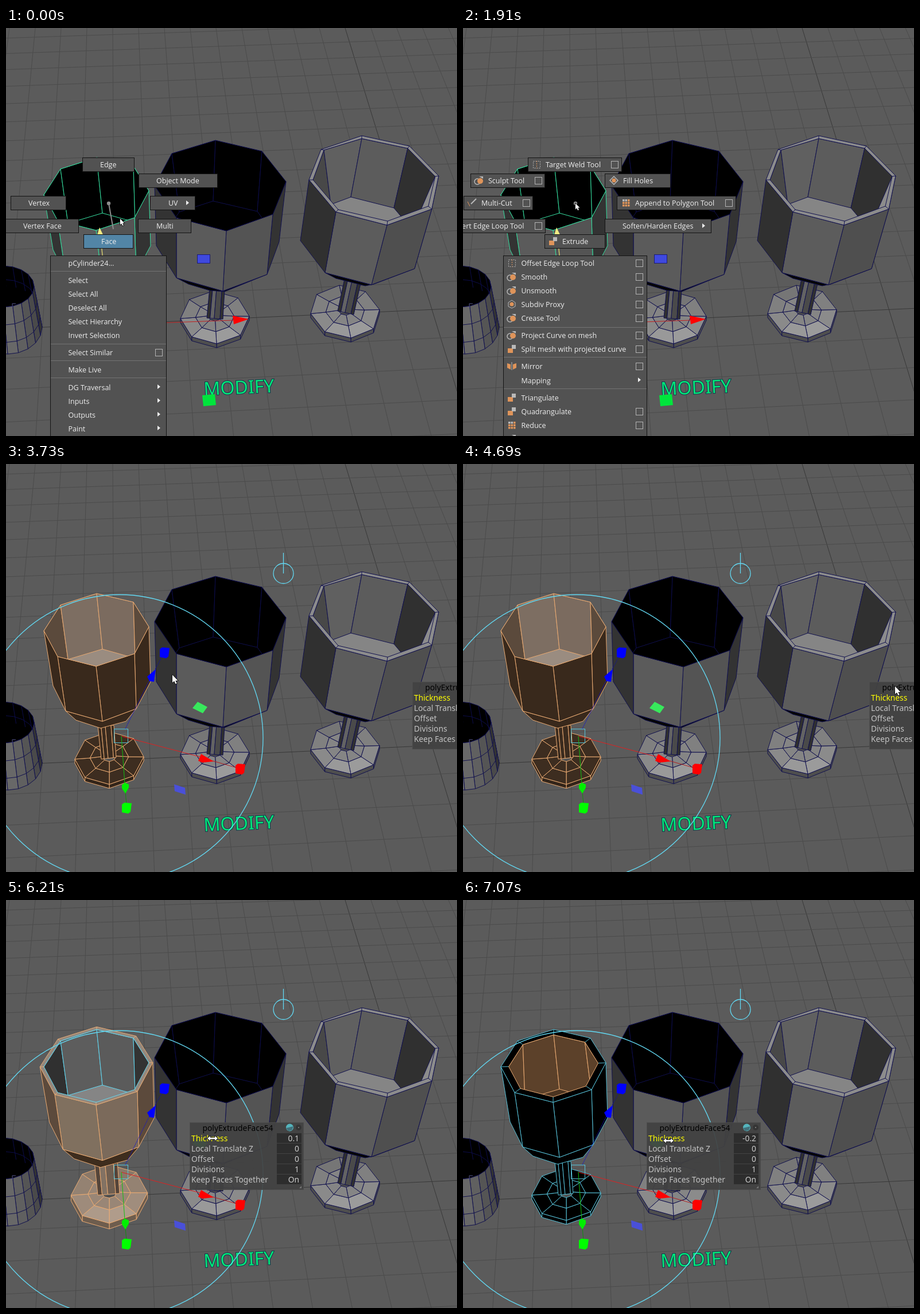
Write an HTML page with a canvas that moves like this. It is 786 px wide and 712 px high and loops after 8 s.

```html
<!DOCTYPE html>
<html lang="en">
<head>
<meta charset="utf-8">
<title>Extruding a goblet</title>
<style>
html, body { margin: 0; width: 100%; height: 100%; overflow: hidden; background: #5b5b5b; }
canvas { display: block; }
</style>
</head>
<body>
<canvas id="stage" width="786" height="712"></canvas>
<script>
const ctx = document.getElementById('stage').getContext('2d');
const LOOP = 8000;
const NAVY = '#11114e', GREEN = '#35dfa0', ORANGE = '#e9aa72', CYAN = '#62d8f2', PEACH = '#df945a';
const MENU_FONT = '12.5px "Open Sans", sans-serif';
const PANEL_FONT = '13.8px "Noto Sans", sans-serif';

// ---------- helpers ----------
const pairs = a => a.reduce((r, n, i) => (i % 2 ? r[r.length - 1].push(n) : r.push([n]), r), []);
const same = (c, n) => Array(n).fill(c);
const mix = (a, b, k) => [a[0] + (b[0] - a[0]) * k, a[1] + (b[1] - a[1]) * k];
const grow = (pts, c, k) => pts.map(p => mix(c, p, k));
const held = (track, t) => track.filter(s => s[0] <= t).pop();

function trace(pts, close) {
  ctx.beginPath();
  pts.forEach(p => ctx.lineTo(p[0], p[1]));
  if (close) ctx.closePath();
}
function poly(pts, fill, wire, width = 1) {
  trace(pts, true);
  if (fill) { ctx.fillStyle = fill; ctx.fill(); }
  if (wire) { ctx.strokeStyle = wire; ctx.lineWidth = width; ctx.stroke(); }
}
function line(color, width, ...xy) {
  trace(pairs(xy));
  ctx.strokeStyle = color;
  ctx.lineWidth = width;
  ctx.stroke();
}
function shape(fill, ...xy) { poly(pairs(xy), fill); }
function rect(x, y, w, h, fill) { ctx.fillStyle = fill; ctx.fillRect(x, y, w, h); }
function frameBox(x, y, w, h, color) {
  ctx.strokeStyle = color;
  ctx.lineWidth = 1;
  ctx.strokeRect(x + .5, y + .5, w - 1, h - 1);
}
function circle(x, y, r, fill, wire, width = 1) {
  ctx.beginPath();
  ctx.arc(x, y, r, 0, 7);
  if (fill) { ctx.fillStyle = fill; ctx.fill(); }
  if (wire) { ctx.strokeStyle = wire; ctx.lineWidth = width; ctx.stroke(); }
}
function label(s, x, y, font, color = '#eeeeee', align = 'left') {
  ctx.font = font;
  ctx.textAlign = align;
  ctx.textBaseline = 'alphabetic';
  ctx.fillStyle = color;
  ctx.fillText(s, x, y + 4.5);
}

// ---------- ground grid ----------
function grid() {
  rect(0, 0, 786, 712, '#5b5b5b');
  const vx = 179, vy = -1338, far = 40860;
  for (let k = -15; k < 6; k++) {
    const x = 591 + 45 * k;
    line(k ? '#4b4b4b' : '#383838', 1, x, 0, vx + (x - vx) * (712 - vy) / -vy, 712);
  }
  for (let k = -5; k < 17; k++) {
    const y = vy + 1855 / (1 + .02674 * k), slope = (vy - y) / (far - vx);
    line(k ? '#4b4b4b' : '#383838', 1, 0, y - vx * slope, 786, y + (786 - vx) * slope);
  }
}

// ---------- goblets: rings run clockwise from the far vertex ----------
const goblet = (rim, low, under, floor, stem, base) => ({
  rim: pairs(rim), low: pairs(low), under: pairs(under),
  floor: pairs(floor), stem: pairs(stem), base: pairs(base)
});
const LEFT = goblet(
  [158, 226, 222, 241, 249, 284, 224, 331, 157, 353, 90, 336, 66, 291, 95, 246],
  [252, 380, 227, 427, 168, 449, 104, 431, 82, 387],
  [122, 447, 165, 461, 209, 449],
  [80, 386, 108, 341, 168, 323, 225, 339, 252, 380],
  [160, 456, 188, 456, 192, 512, 166, 515],
  [180, 513, 60, -2, 0, 46]);
const MIDDLE = goblet(
  [365, 196, 446, 215, 488, 268, 465, 325, 384, 354, 297, 331, 259, 275, 289, 219],
  [476, 373, 455, 430, 378, 459, 297, 436, 262, 380],
  [318, 447, 355, 458, 381, 460],
  [262, 380, 302, 321, 361, 302, 438, 320, 476, 373],
  [355, 454, 381, 456, 378, 508, 350, 506],
  [364, 505, 60, -2, 3, 46]);
const RIGHT = goblet(
  [620, 188, 703, 206, 754, 258, 742, 316, 664, 344, 575, 321, 528, 265, 549, 212],
  [720, 385, 712, 420, 637, 448, 556, 427, 513, 371],
  [575, 437, 626, 450, 641, 447],
  [522, 365, 566, 308, 601, 295, 676, 314, 708, 352],
  [590, 438, 618, 446, 606, 500, 578, 494],
  [591, 495, 60, -3.5, 10, 46]);
RIGHT.lip = pairs([620, 193, 700, 210, 748, 259, 736, 311, 665, 337, 579, 317, 535, 265, 554, 213]);

const STONE = {
  wire: NAVY, out: ['#333333', '#545454', '#5b5b5b', '#333333'], under: '#050505',
  stem: ['#2f2f2f', '#636363', '#4a4a4a', '#303030'],
  base: ['#8b8b8b', '#9b9b9b', '#999999', '#8a8a8a', '#808080', '#767676', '#767676', '#808080'],
  mid: '#858585', skirt: '#4e4e4e', lip: '#8c8c8c',
  inWire: '#0c0c4a', inside: same('#000000', 4), floor: '#000000'
};
const LIT = { inside: ['#484848', '#606060', '#5c5c5c', '#303030'], floor: '#858585' };
const LOOKS = {
  stone: STONE,
  hollow: { ...STONE, ...LIT, inWire: NAVY, out: ['#333333', '#4f4f4f', '#5c5c5c', '#303030'] },
  picked: { ...STONE, wire: GREEN, inWire: GREEN },
  faces: {
    wire: ORANGE, out: same('#39291c', 4), under: '#39291c', stem: same('#3b2b1e', 4),
    base: same('#3d2d20', 8), mid: '#3d2d20', skirt: '#33251a', lip: '#000',
    inWire: ORANGE, inside: ['#5b4a3c', '#7d6e62', '#7b6b5f', '#5b4a3c'], floor: '#9a8c80'
  },
  thick: {
    wire: ORANGE, out: ['#5c4a3c', '#7b6a5b', '#80705f', '#5c4a3c'], under: '#3e2d1e',
    stem: ['#55453a', '#837263', '#705f51', '#54443a'],
    base: ['#a08d7d', '#b09c8b', '#ad9a89', '#9e8b7b', '#948272', '#8a7868', '#8a7868', '#948272'],
    mid: '#998676', skirt: '#6e5d4e', lip: '#94887d', inWire: CYAN,
    inside: ['#303030', '#5d5d5d', '#5b5b5b', '#333333'], floor: '#858585'
  },
  inner: {
    wire: '#55bfd6', out: same('#000000', 4), under: '#000', stem: same('#000000', 4),
    base: same('#000000', 8), mid: '#000', skirt: '#000', lip: '#000',
    inWire: ORANGE, inside: same('#5c412a', 4), floor: '#4b3421'
  }
};

function foot([c, u, v], look, k, drop) {
  const ring = (s, dy) => [...Array(8)].map((_, i) => {
    const a = i * Math.PI / 4, p = Math.cos(a) * s, q = Math.sin(a) * s;
    return [c[0] + u[0] * p + v[0] * q, c[1] + u[1] * p + v[1] * q + dy];
  });
  const edge = ring(k, 0), bottom = ring(k, drop), mid = ring(k * .56, -1), hub = ring(k * .2, -3);
  for (let i = 0; i < 4; i++) {
    poly([edge[i], edge[i + 1], bottom[i + 1], bottom[i]], look.skirt, look.wire);
  }
  for (let i = 0; i < 8; i++) {
    const j = (i + 1) % 8;
    poly([edge[i], edge[j], mid[j], mid[i]], look.base[i], look.wire);
    poly([mid[i], mid[j], hub[j], hub[i]], look.mid, look.wire);
  }
}

function drawGoblet(g, look, thickness = 0) {
  const t = Math.max(thickness, 0), k = 1 + .74 * t;
  const rim = grow(g.rim, [158, 289], k);
  const low = grow(g.low, [167, 375], k);
  const under = grow(g.under, [166, 385], k);
  let lip = g.lip;
  if (thickness > 0) lip = g.rim;
  if (thickness < 0) lip = grow(g.rim, [158, 289], 1 + .74 * thickness);

  foot(g.base, look, 1 + 1.1 * t, 7 + 30 * t);

  const [a, b, c, d] = g.stem.map((p, i) => [p[0] + (i % 3 ? 60 : -60) * t, p[1]]);
  const cuts = [0, .2, .46, .82, 1];
  look.stem.forEach((fill, i) => poly(
    [mix(a, b, cuts[i]), mix(a, b, cuts[i + 1]), mix(d, c, cuts[i + 1]), mix(d, c, cuts[i])], fill, look.wire));

  poly([low[1], low[2], low[3], ...under], look.under, look.wire);
  look.out.forEach((fill, i) => poly([rim[i + 2], rim[i + 3], low[i + 1], low[i]], fill, look.wire));

  if (lip) {
    poly(rim, look.lip, look.wire);
    rim.forEach((p, i) => line(look.wire, 1, ...p, ...lip[i]));
  }
  const mouth = lip || rim, dy = thickness < 0 ? 7 : 0;
  const floor = g.floor.map(p => [p[0], p[1] + dy]);
  ctx.save();
  trace(mouth, true);
  ctx.clip();
  poly([...floor, [floor[4][0], 450], [floor[0][0], 450]], look.floor);
  look.inside.forEach((fill, i) => poly(
    [mouth[(i + 6) % 8], mouth[(i + 7) % 8], floor[i + 1], floor[i]], fill, look.inWire));
  ctx.restore();
  poly(mouth, null, look.inWire);
}

function barrel() {
  const dot = (cx, cy, rx, ry, i) => [cx + rx * Math.cos(i * Math.PI / 10), cy + ry * Math.sin(i * Math.PI / 10)];
  const top = i => dot(-5, 451, 54, 36, i), bottom = i => dot(3, 522, 60, 47, i);
  const tones = ['#2b2b2b', '#333333', '#4a4a4a', '#555555', '#606060', '#686868', '#6a6a6a'];
  for (let i = -1; i < 6; i++) {
    poly([top(i), top(i + 1), bottom(i + 1), bottom(i)], tones[i + 1], NAVY);
    for (const k of [.38, .75]) {
      line(NAVY, 1, ...mix(top(i), bottom(i), k), ...mix(top(i + 1), bottom(i + 1), k));
    }
  }
  const ring = [...Array(20)].map((_, i) => top(i));
  poly(ring, '#000', NAVY);
  ctx.save();
  trace(ring, true);
  ctx.clip();
  for (let i = 10; i < 21; i++) line('#0c0c4a', 1, ...top(i), ...mix(top(i), bottom(i), .6));
  poly(ring.map(p => [p[0] + 2, p[1] + 24]), null, '#0c0c4a');
  ctx.restore();
  line('#55558c', 1, 11, 488, 11, 481, 17, 481);
}

function sign() {
  ctx.save();
  ctx.translate(345, 641);
  ctx.transform(1, -.042, .05, 1, 0, 0);
  ctx.font = '32px "Noto Sans", sans-serif';
  ctx.textAlign = 'left';
  ctx.textBaseline = 'alphabetic';
  ctx.lineWidth = 2;
  ctx.strokeStyle = '#15364a';
  ctx.strokeText('MODIFY', 0, 0);
  ctx.fillStyle = '#00e87a';
  ctx.fillText('MODIFY', 0, 0);
  ctx.restore();
}

// ---------- manipulators ----------
function moveGizmo() {
  line('#c02020', 1, 204, 517, 396, 510);
  shape('#ff0000', 395, 502, 397, 517, 423, 508);
  line('#2626c8', 1, 179.5, 518, 179.5, 704);
  circle(179, 709, 7, '#0000f0');
  line('#e2d873', 1.3, 166, 376, 179, 506);
  shape('#f2ec84', 163, 348, 173, 369, 171, 375, 164, 377, 158, 373, 157, 368);
  frameBox(168, 506, 25, 25, '#4fb6cc');
  rect(333, 395, 23, 16, '#1c1c70');
  rect(334, 396, 21, 14, '#3f49de');
  shape('#00e53c', 342, 641, 364, 639, 366, 658, 344, 660);
}
function cube(x, y, color) {
  shape(color, x - 8, y - 6, x - 4, y - 9, x + 9, y - 8, x + 7, y + 7, x + 3, y + 10, x - 8, y + 8);
}
function extrudeGizmo() {
  circle(198, 478, 250, null, CYAN, 1.3);
  circle(483.5, 191, 17.5, null, CYAN, 1.3);
  line(CYAN, 1.3, 483.5, 155, 483.5, 191);
  frameBox(188, 462, 25, 25, '#58c4da');
  ctx.setLineDash([2, 1]);
  line('#1010d8', 1, 208, 462, 250, 377);
  line('#1010a0', 1, 260, 358, 271, 338);
  ctx.setLineDash([]);
  shape('#0000ff', 261, 358, 246, 371, 250, 379, 258, 380);
  cube(276, 329, '#0000ff');
  line('#e02020', 1, 201, 475, 338, 511);
  line('#b02020', 1, 360, 518, 402, 530);
  shape('#ff0000', 340, 506, 335, 518, 342, 521, 362, 519);
  cube(408, 532, '#ff0000');
  line('#10c010', 1, 201, 475, 207, 558);
  line('#109010', 1, 208, 572, 210, 594);
  shape('#00f000', 202, 560, 207, 556, 214, 559, 214, 565, 208, 575, 202, 566);
  cube(210, 600, '#00ff00');
  shape('#38e85c', 325, 426, 334, 415, 351, 424, 343, 435);
  shape('#4a50d8', 293, 559, 312, 565, 313, 577, 294, 571);
}

// ---------- menus ----------
function arrowMark(x, y) { shape('#f0f0f0', x, y - 4, x, y + 4, x + 5, y); }
function optionBox(x, y) { frameBox(x - 6, y - 6, 13, 13, '#b4b4b4'); }
function plate(x, y, w, h, fill = '#525252') {
  rect(x, y, w, h, '#141414');
  rect(x + 1, y + 1, w - 2, h - 2, fill);
}

function icon(kind, x, y) {
  const g = '#b9b9b9';
  if (kind === 'grid') {
    ctx.setLineDash([2, 2]);
    frameBox(x - 6, y - 6, 13, 13, g);
    line(PEACH, 1, x + .5, y - 6, x + .5, y + 7);
    ctx.setLineDash([]);
  } else if (kind === 'ball') {
    circle(x - 3, y + 2, 5, null, g, 1.5);
    circle(x + 2, y + 1, 5, PEACH);
    shape(g, x, y - 7, x + 7, y - 7, x + 7, y - 3);
  } else if (kind === 'blade') {
    line(g, 2, x - 2, y + 2, x + 7, y - 7);
    line(PEACH, 1, x - 8, y - 2, x - 4, y + 6);
  } else if (kind === 'diamond') {
    shape(g, x, y - 8, x + 8, y, x, y + 8, x - 8, y);
    shape('#525252', x, y - 6, x + 6, y, x, y + 6, x - 6, y);
    circle(x, y, 3.5, PEACH);
  } else if (kind === 'tiles') {
    for (let i = 0; i < 9; i++) rect(x - 6 + i % 3 * 4.5, y - 6 + (i / 3 | 0) * 4.5, 3.5, 3.5, i < 2 ? g : PEACH);
  } else if (kind === 'twin') {
    shape(PEACH, x - 8, y - 5, x - 2, y - 3, x - 2, y + 6, x - 8, y + 3);
    shape(PEACH, x + 8, y - 5, x + 2, y - 3, x + 2, y + 6, x + 8, y + 3);
    line(g, 1, x, y - 7, x, y + 7);
  } else if (kind === 'hull') {
    poly(pairs([x, y - 7, x + 6, y - 3, x + 6, y + 4, x, y + 7, x - 6, y + 4, x - 6, y - 3]), null, g);
    circle(x, y, 3.5, PEACH);
  } else {
    rect(x - 7, y - 1, 9, 8, PEACH);
    rect(x, y - 7, 7, 7, g);
  }
}

// label, left, top, width, text x, then optional icon, option box x, arrow x
const PIE_A = [
  ['Edge', 133, 226, 91, 164], ['Object Mode', 231, 254, 138, 262],
  ['Vertex', 8, 293, 97, 39], ['UV', 251, 293, 79, 283, '', 0, 314],
  ['Vertex Face', -2, 333, 129, 30], ['Multi', 230, 333, 93, 262], ['Face', 135, 360, 87, 166]
];
const PIE_B = [
  ['Target Weld Tool', 113, 226, 164, 144, 'grid', 264], ['Sculpt Tool', 13, 254, 130, 44, 'ball', 131],
  ['Fill Holes', 247, 254, 115, 279, 'diamond'], ['Multi-Cut', 1, 293, 121, 32, 'blade', 110],
  ['Append to Polygon Tool', 268, 293, 208, 300, 'tiles', 463],
  ['Insert Edge Loop Tool', -48, 333, 192, -19, '', 131],
  ['Soften/Harden Edges', 247, 333, 186, 278, '', 0, 417], ['Extrude', 142, 360, 106, 173, 'block']
];
function pie(items, hot) {
  for (const [name, x, y, w, tx, pic, box, arrow] of items) {
    plate(x, y, w, 25, name === hot ? '#5285a6' : '#525252');
    if (pic) icon(pic, tx - 16, y + 12);
    label(name, tx, y + 12.5, MENU_FONT);
    if (box) optionBox(box, y + 12);
    if (arrow) arrowMark(arrow, y + 12);
  }
}

// label, y, trailing mark, icon
const LIST_A = [
  ['pCylinder24...', 410], ['Select', 440], ['Select All', 464], ['Deselect All', 488],
  ['Select Hierarchy', 512], ['Invert Selection', 536], ['Select Similar', 566, 'box'],
  ['Make Live', 596], ['DG Traversal', 627, 'arrow'], ['Inputs', 651, 'arrow'],
  ['Outputs', 675, 'arrow'], ['Paint', 699, 'arrow']
];
const LIST_B = [
  ['Offset Edge Loop Tool', 410, 'box', 'grid'], ['Smooth', 434, 'box', 'ball'],
  ['Unsmooth', 458, 'box', 'ball'], ['Subdiv Proxy', 482, 'box', 'hull'],
  ['Crease Tool', 506, 'box', 'ball'], ['Project Curve on mesh', 536, 'box', 'ball'],
  ['Split mesh with projected curve', 560, 'box', 'block'], ['Mirror', 590, 'box', 'twin'],
  ['Mapping', 615, 'arrow'], ['Triangulate', 645, '', 'block'],
  ['Quadrangulate', 669, 'box', 'block'], ['Reduce', 693, 'box', 'tiles'], ['', 717, '', 'ball']
];
function list(items, x, w, rules) {
  plate(x, 397, w, 330);
  for (const y of rules) rect(x + 1, y, w - 2, 1, '#737373');
  for (const [name, y, mark, pic] of items) {
    label(name, x + 31.5, y, MENU_FONT);
    if (pic) icon(pic, x + 15, y);
    if (mark === 'box') optionBox(x + w - 14, y);
    if (mark === 'arrow') arrowMark(x + w - 16, y - 1);
  }
}

// ---------- parameter panel ----------
function panel(x, y, value) {
  rect(x, y, 199, 118, 'rgba(66,66,66,.93)');
  frameBox(x, y, 199, 118, '#4c4c4c');
  label('polyExtrudeFace54', x + 84, y + 10, PANEL_FONT, '#000', 'center');
  circle(x + 174.5, y + 9, 6.5, '#55b5bd');
  shape('#41707a', x + 168, y + 10, x + 181, y + 7, x + 178, y + 14, x + 172, y + 15);
  circle(x + 190, y + 9, 5, '#353535');
  rect(x + 189, y + 8, 2, 2, '#777');
  const rows = [['Thickness', value], ['Local Translate Z', '0'], ['Offset', '0'], ['Divisions', '1'], ['Keep Faces Together', 'On']];
  rows.forEach(([name, v], i) => {
    const cy = y + 28 + 18 * i;
    label(name, x + 3, cy, PANEL_FONT, i ? '#c4c4c4' : '#ffff00');
    rect(x + 152, cy - 9, 43, 17, '#2d2d2d');
    label(v, x + 191, cy, PANEL_FONT, '#cccccc', 'right');
  });
  shape('#777', x + 195, y + 111, x + 195, y + 115, x + 191, y + 115);
}

// ---------- pointers ----------
const ARROW = pairs([0, 0, 0, 15, 3.6, 12, 6, 17.5, 8.5, 16.5, 6, 11, 10.6, 11]);
const DOUBLE = pairs([-9, 0, -4, -4, -4, -1.2, 4, -1.2, 4, -4, 9, 0, 4, 4, 4, 1.2, -4, 1.2, -4, 4]);
function pointer(x, y, kind) {
  const scale = kind === 'small' ? .68 : kind === 'double' ? 1 : .9;
  if (kind === 'select') frameBox(x - 4, y - 3, 10, 10, '#000'), frameBox(x - 3, y - 2, 8, 8, '#d0d0d0');
  const pts = (kind === 'double' ? DOUBLE : ARROW).map(p => [x + p[0] * scale, y + p[1] * scale]);
  ctx.lineJoin = 'round';
  poly(pts, null, '#1a1a1a', 2);
  poly(pts, '#fff');
  ctx.lineJoin = 'miter';
}

// ---------- timing: every value holds until the next step ----------
const POINTER = [
  [0, 199, 333, 'small'], [120, 212, 316, 'small'], [240, 236, 286, 'small'], [360, 249, 267, 'small'],
  [920, 249, 266, 'select'], [1070, 240, 273, 'select'], [1210, 221, 288, 'select'],
  [1350, 203, 301, 'select'], [1490, 196, 306, 'select'], [1910, 196, 306, 'small'],
  [2780, 195, 342, 'small'], [2930, 195, 352, 'small'], [3060, 194, 361, 'small'], [3200, 194, 366, 'small'],
  [3470, 205, 366], [3630, 290, 368], [3790, 430, 374], [3950, 580, 381], [4100, 690, 386],
  [4260, 744, 389], [4420, 755, 390], [4690, 753, 388], [4970, 733, 389], [5110, 640, 391],
  [5250, 510, 394], [5390, 400, 396], [5530, 365, 397], [5650, 364, 404], [5800, 359, 411],
  [6060, 357, 416, 'double'], [6210, 360, 416, 'double'], [6340, 366, 417, 'double'],
  [6480, 363, 418, 'double'], [6620, 359, 419, 'double'], [6760, 357, 420, 'double'], [7070, 358, 420, 'double']
];
const STROKE = [
  [0, 187, 351], [120, 206, 330], [240, 232, 296], [360, 245, 272],
  [1910, 196, 306], [2780, 196, 328], [2930, 196, 340], [3060, 195, 352], [3200, 195, 358]
];
const HOT = [[0, 'Face'], [120, ''], [240, 'Object Mode'], [1910, ''], [2780, 'Extrude']];
const THICKNESS = [[0, 0], [6210, .1], [6340, .6], [6480, .3], [6620, -.1], [6760, -.2]];

function marking(t, x, y) {
  const [, sx, sy] = held(STROKE, t);
  line('#8c8c8c', 2, x, y, sx, sy);
  circle(x, y, 3.2, '#8c8c8c');
}

function draw(t) {
  const thickness = held(THICKNESS, t)[1];
  const [, px, py, kind] = held(POINTER, t);
  const extruding = t >= 3470;
  let look = LOOKS.picked;
  if (extruding) look = thickness > 0 ? LOOKS.thick : thickness < 0 ? LOOKS.inner : LOOKS.faces;

  grid();
  barrel();
  drawGoblet(MIDDLE, LOOKS.stone);
  drawGoblet(RIGHT, LOOKS.hollow);
  drawGoblet(LEFT, look, thickness);
  sign();

  if (extruding) {
    extrudeGizmo();
    let x = 708, y = 380;
    if (t >= 5530) { x = 320; y = 388; }
    else if (t >= 4970) { x = px - 45; y = py - 9; }
    panel(x, y, String(thickness));
  } else {
    moveGizmo();
    if (t < 920) {
      marking(t, 179, 306);
      list(LIST_A, 77, 203, [424, 551, 580, 610]);
      pie(PIE_A, held(HOT, t)[1]);
    } else if (t >= 1910) {
      marking(t, 196, 306);
      list(LIST_B, 70, 251, [522, 574, 629]);
      pie(PIE_B, held(HOT, t)[1]);
    }
  }
  pointer(px, py, kind);
}

const start = performance.now();
function tick() {
  draw((performance.now() - start) % LOOP);
  requestAnimationFrame(tick);
}
tick();
</script>
</body>
</html>
```
